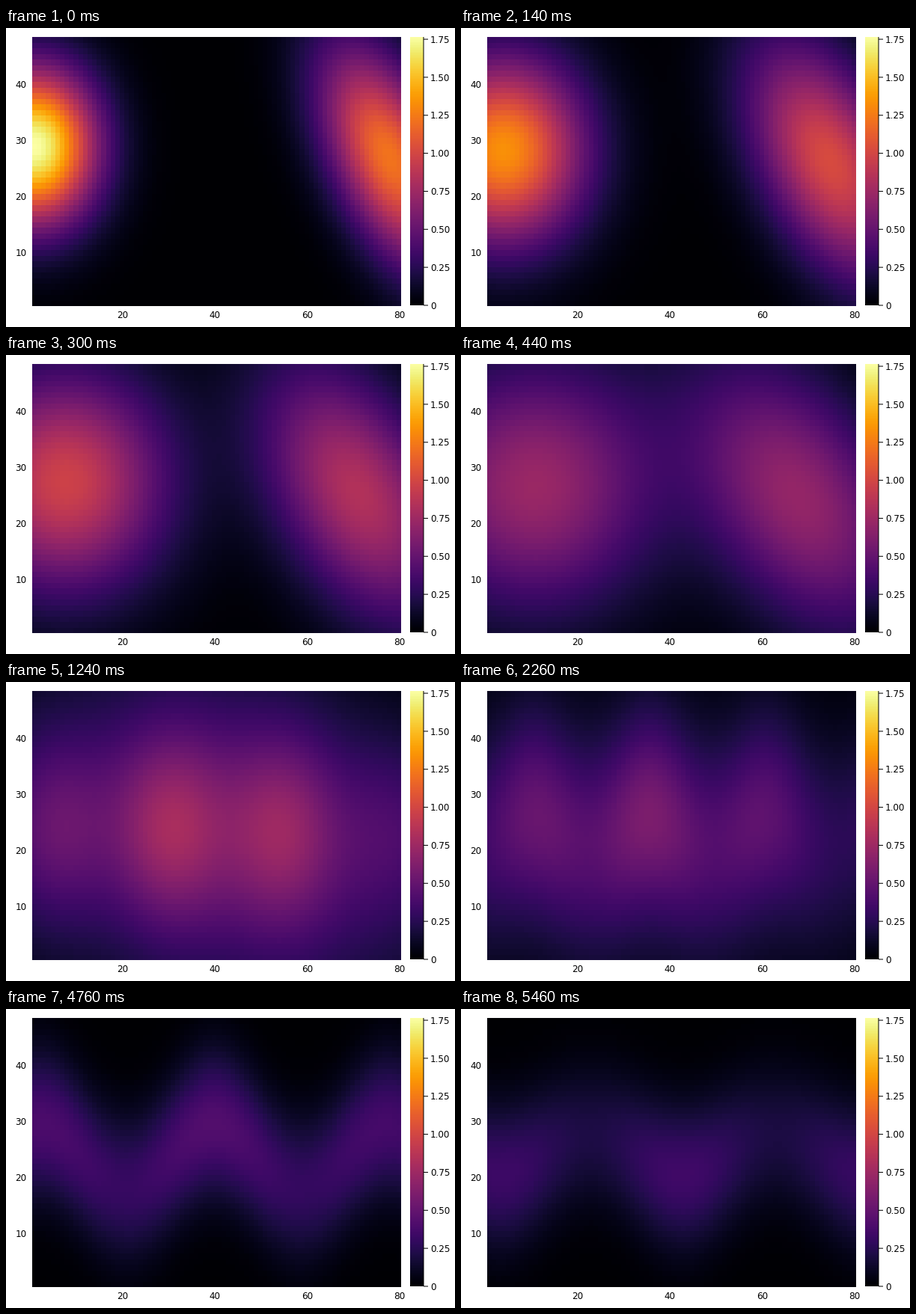
Animation of 600 by 400 pixels, one loop 5.68 s. Source, as a matplotlib script:

```python
import numpy as np
import matplotlib.pyplot as plt
from matplotlib.animation import FuncAnimation

W, H, DPI = 600, 400, 100
STEP, LOOP = 20, 5680
COLS, ROWS = 80, 48
VMAX = 1.765
LEFT, RIGHT, TOP, BOTTOM = 35, 528, 12, 372
BAR_LEFT, BAR_RIGHT, BAR_BOTTOM = 540, 558, 371

X, Y = np.meshgrid(np.arange(1, COLS + 1), np.arange(1, ROWS + 1))


def bell(d, width):
    return np.exp(-(d / width) ** 2 / 2)


def left_packet(t):
    """Hot spot on the left wall that drifts inwards, spreads and decays."""
    dx = X - (1 + t / 45)
    dy = Y - (29 - t / 200)
    return (1.765 * np.exp(-t / 500)
            * bell(dx, 9.5 + t / 50) * bell(dy, 9.8 + t / 75))


def right_packet(t):
    """Leaning ridge by the right wall, with the same kind of motion."""
    dy = Y - (27 - t / 200)
    dx = X - (78 - t / 44) + .4 * dy
    return (1.22 * np.exp(-t / 800)
            * bell(dx, 9 + t / 75) * bell(dy, 14 + t / 150))


def pool(t):
    """Band left behind by the packets, bent and modulated by one wave."""
    def track(*values):
        return np.interp(t, (440, 1240, 3340, 4760, 5460), values)

    strength = track(0, .38, .53, .37, .28)
    width = track(40, 40, 40, 80, 100)
    height = track(12, 12, 14, 9, 9)
    swing = track(0, 0, 4.5, 5.5, -3.5)
    depth = track(.2, .2, .1, .15, .25)
    crest = track(4, 4, 16, 2, 3)
    length = track(26, 26, 26, 38, 40)

    wave = np.cos(2 * np.pi * (X - crest) / length)
    return (strength * (1 + depth * wave)
            * bell(X - 34, width) * bell(Y - 24 - swing * wave, height))


def heat(t):
    return left_packet(t) + right_packet(t) + pool(t)


plt.rcParams["font.family"] = "DejaVu Sans"
fig = plt.figure(figsize=(W / DPI, H / DPI), dpi=DPI, facecolor="white")
ax = fig.add_axes([0, 0, 1, 1])
style = dict(cmap="inferno", origin="lower", aspect="auto",
             interpolation="nearest")
image = ax.imshow(heat(0), extent=(LEFT, RIGHT, BOTTOM, TOP),
                  vmin=0, vmax=VMAX, **style)
ax.imshow(np.linspace(0, 1, 256)[:, None],
          extent=(BAR_LEFT, BAR_RIGHT, BAR_BOTTOM, TOP), **style)
ax.set_xlim(0, W)
ax.set_ylim(H, 0)
ax.axis("off")


def label(x, y, text, align):
    ax.text(x, y + 4.7, text, ha=align, va="baseline",
            fontsize=12 * 72 / DPI, color="black")


def line(xs, ys):
    ax.plot(xs, ys, color="black", lw=72 / DPI, solid_capstyle="butt",
            snap=False)


for value in range(20, COLS + 1, 20):
    label(LEFT + (value - .5) / COLS * (RIGHT - LEFT) + .6, 383.2,
          value, "center")
for value in range(10, ROWS, 10):
    label(27.5, BOTTOM - (value - .5) / ROWS * (BOTTOM - TOP), value, "right")

line([BAR_RIGHT, BAR_RIGHT], [TOP, BAR_BOTTOM])
for value in np.arange(0, VMAX, .25):
    y = BAR_BOTTOM - value / VMAX * (BAR_BOTTOM - TOP)
    line([BAR_RIGHT, BAR_RIGHT + 6], [y, y])
    label(567, y, f"{value:.2f}" if value else "0", "left")


def draw(i):
    image.set_data(heat(i * STEP))
    return [image]


anim = FuncAnimation(fig, draw, frames=LOOP // STEP, interval=STEP,
                     repeat=True, repeat_delay=0, blit=False)
plt.show()
```
